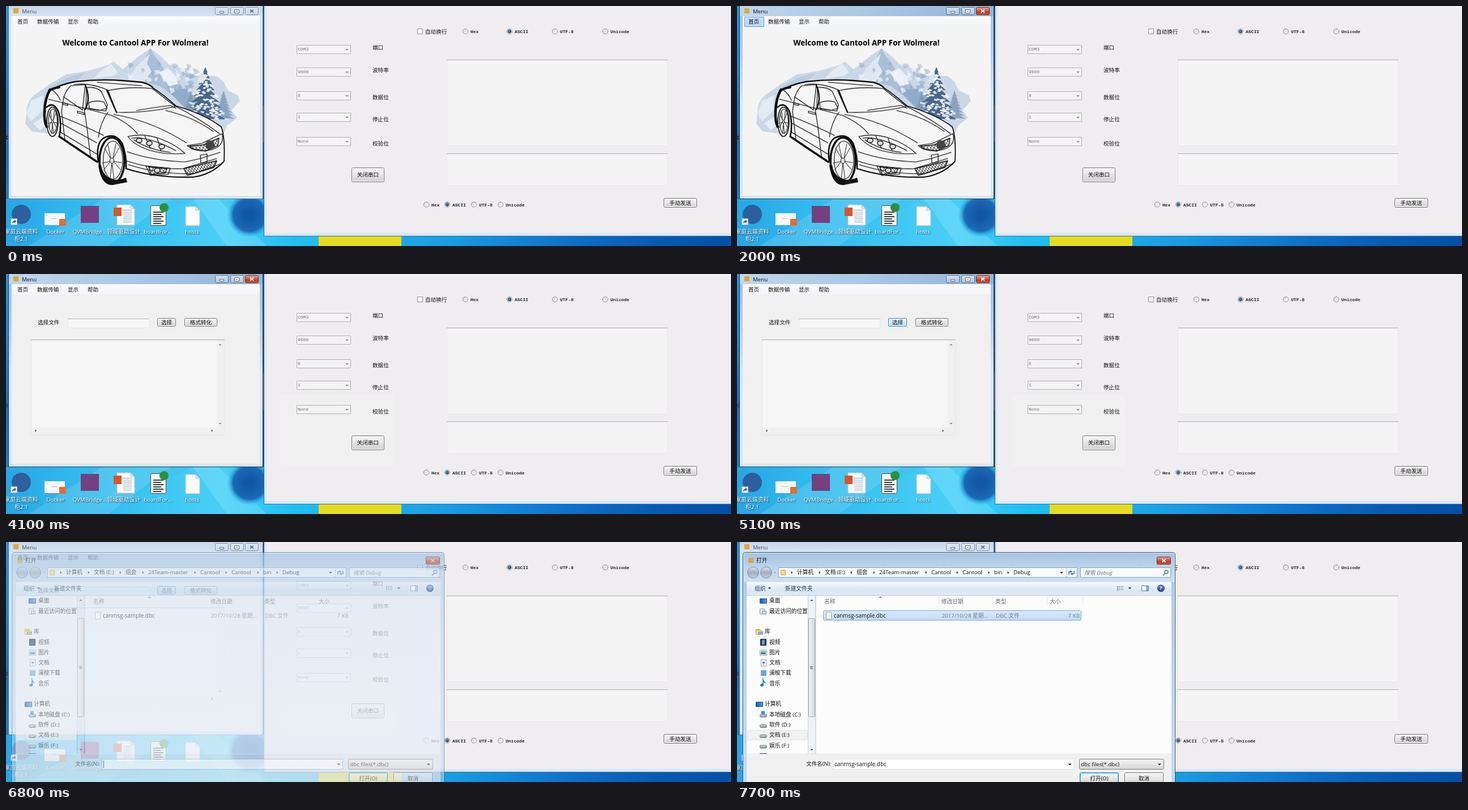
Write an HTML page with a canvas that moves like this. It is 1280 px wide and 425 px high and loops after 8000 ms.

```html
<!DOCTYPE html>
<html lang="zh-CN">
<head>
<meta charset="utf-8">
<title>Cantool</title>
<style>
html, body { margin: 0; width: 100%; height: 100%; overflow: hidden; background: #1583d6; }
canvas { display: block; width: 100vw; height: 100vh; }
</style>
</head>
<body>
<canvas id="stage" width="1280" height="425"></canvas>
<script>
const g = document.getElementById('stage').getContext('2d');
const LOOP = 8000, STEP = 100;
const UI = '"Open Sans", "Noto Sans CJK SC", "Noto Sans CJK", sans-serif';
const MONO = '"Liberation Mono", "Noto Sans CJK SC", "Noto Sans CJK", monospace';
const within = (t, a, b) => t >= a && t < b;
const clamp = v => Math.max(0, Math.min(1, v));

function fade(x0, y0, x1, y1, colors) {
  const f = g.createLinearGradient(x0, y0, x1, y1);
  colors.forEach((c, i) => f.addColorStop(i / (colors.length - 1), c));
  return f;
}
const vert = (y, h, ...colors) => fade(0, y, 0, y + h, colors);

function rect(x, y, w, h, fill) {
  g.fillStyle = fill;
  g.fillRect(x, y, w, h);
}
function box(x, y, w, h, fill, line, r = 0) {
  g.beginPath();
  g.roundRect(x + .5, y + .5, w - 1, h - 1, r);
  if (fill) { g.fillStyle = fill; g.fill(); }
  if (line) { g.strokeStyle = line; g.lineWidth = 1; g.stroke(); }
}
function disc(x, y, r, fill, line, ry = r) {
  g.beginPath();
  g.ellipse(x, y, r, ry, 0, 0, 7);
  if (fill) { g.fillStyle = fill; g.fill(); }
  if (line) { g.strokeStyle = line; g.stroke(); }
}
function shape(d, fill, line, w = 1) {
  const p = new Path2D(d);
  if (fill) { g.fillStyle = fill; g.fill(p); }
  if (line) { g.strokeStyle = line; g.lineWidth = w; g.stroke(p); }
}
// cy is the optical middle of the line
function text(s, x, cy, { size = 9.8, color = '#111', font = UI, weight = '', align = 'left' } = {}) {
  g.font = `${weight} ${size}px ${font}`;
  g.textAlign = align;
  g.fillStyle = color;
  g.fillText(s, x, cy + size * .36);
}
function arrow(x, y, r, color, turn = 0) {
  g.save();
  g.translate(x, y);
  g.rotate(turn * Math.PI / 2);
  shape(`M${-r} ${-r / 2}L${r} ${-r / 2}L0 ${r / 2}Z`, color);
  g.restore();
}
function button(x, y, w, h, label, glow = 0, focus = false) {
  box(x, y, w, h, vert(y, h, '#f4f4f4', '#ececec', '#dcdcdc', '#cfcfcf'), focus ? '#2c86b8' : '#707070', 2);
  if (glow) {
    g.save();
    g.globalAlpha *= glow;
    box(x, y, w, h, vert(y, h, '#eaf6fd', '#d9f0fc', '#bee6fd', '#a7d9f5'), '#3c7fb1', 2);
    g.restore();
  }
  box(x + 1, y + 1, w - 2, h - 2, null, focus ? '#5fd0f3' : '#fafafa', 1.5);
  text(label, x + w / 2, y + h / 2, { size: 9.6, align: 'center' });
}
function field(x, y, w, h, fill, top) {
  box(x, y, w, h, fill, '#e8e7eb');
  rect(x, y, w, 1, top);
}
function closeBox(x, y, w, h, red) {
  const fill = red ? vert(y, h, '#e8b0a4', '#d4735f', '#c0381f', '#d8694c') : vert(y, h, '#dde8f3', '#cbdaea');
  box(x, y, w, h, fill, red ? '#6d2a25' : '#8493a6', 2);
  const cx = x + w / 2, cy = y + h / 2;
  shape(`M${cx - 3} ${cy - 2.5}l6 5m0 -5l-6 5`, null, red ? '#fff' : '#6a7583', 1.7);
}
function formIcon(x, y) {
  rect(x, y, 9, 9, '#d9a83c');
}

function wallpaper() {
  rect(0, 0, 1280, 425, fade(0, 0, 1280, 0,
    ['#1b9be0', '#2bb8ee', '#3cc6f3', '#4acff6', '#1fc0f2', '#1bb2ec', '#1a9fe4', '#1285d6', '#0d6cc4', '#085ab2', '#0450a6']));
  shape('M0 342H330L150 425H0Z', 'rgba(60,190,235,.35)');
  shape('M170 342L290 342L180 425L40 425Z', 'rgba(255,255,255,.12)');
  shape('M330 342L375 342L460 425L390 425Z', 'rgba(190,245,255,.2)');
  rect(0, 0, 5, 342, vert(0, 342, '#2293e2', '#1f8ade', '#1274cc', '#1480d2'));
  const shade = g.createRadialGradient(430, 370, 8, 430, 370, 40);
  shade.addColorStop(0, '#1257a6');
  shade.addColorStop(.65, '#1b69b6');
  shade.addColorStop(1, 'rgba(31,180,235,0)');
  rect(388, 342, 70, 66, shade);
  rect(552, 408, 146, 146, '#e6dc1e');
  disc(3, 233, 2.5, null, '#222');
  rect(453, 0, 3, 342, '#1d4f80');
  rect(453, 107, 2, 26, '#6b3428');
  rect(453, 175, 2, 66, '#a2603a');
}

function sheet(x, y, w, h) {
  shape(`M${x} ${y}h${w - 7}l7 7v${h - 7}h${-w}Z`, '#fbfcfd', '#b9c3cc');
  shape(`M${x + w - 7} ${y}v7h7Z`, '#dfe5ea', '#b9c3cc');
}
function desktopIcons() {
  disc(27, 369, 17, '#2d5f9e');
  box(8, 376, 12, 12, '#f5f8fb', '#9db0c4');
  shape('M11 385q0-4 4-5v-2l3 3.500l-3 3.500v-2q-2 0-4 2Z', '#1d5fae');
  rect(68, 367, 36, 21, '#f6f6f6');
  rect(80, 376, 10, 1, '#bbb');
  rect(94, 377, 12, 12, '#df6d3a');
  rect(132, 354, 32, 30, '#74407f');
  sheet(196, 352, 31, 36);
  for (let i = 0; i < 7; i++) rect(207, 361 + i * 3.5, 15, 1, '#8fa3b8');
  rect(190, 357, 14, 15, '#d4562c');
  box(255, 353, 28, 36, '#f7f7f7', '#3d4a44', 2);
  for (let i = 0; i < 6; i++) rect(260, 364 + i * 4, i % 2 ? 14 : 18, 2, '#39443f');
  disc(279, 357, 8, '#2f8f3e');
  sheet(317, 355, 25, 34);

  g.save();
  g.shadowColor = 'rgba(0,20,50,.9)';
  g.shadowBlur = 2;
  g.shadowOffsetX = g.shadowOffsetY = 1;
  const names = ['家庭云端资料', 'Docker', 'QVMBridge...', '领域驱动设计', 'boardFor...', 'hosts'];
  names.forEach((s, i) => text(s, 27 + i * 60.3, 399, { color: '#fff', align: 'center' }));
  text('柜2.1', 27, 412, { color: '#fff', align: 'center' });
  g.restore();
}

function radio(x, y, label, on) {
  g.lineWidth = 1;
  disc(x, y, 4.6, fade(x - 4, y - 4, x + 4, y + 4, ['#d4d6d8', '#fbfbfb']), '#8e8f8f');
  if (on) disc(x, y, 2.7, fade(x - 2, y - 2, x + 2, y + 2, ['#5fb4de', '#12395c']), '#174a72');
  text(label, x + 9, y + .5, { size: 8, font: MONO, weight: 'bold', color: '#222' });
}
function serialWindow(t) {
  rect(455, 0, 825, 408, '#3d698f');
  rect(456, 0, 824, 407, '#d8e7f4');
  rect(460, 2, 820, 400, '#f0edf1');
  rect(460, 1, 820, 1, '#fafbfd');
  if (t >= 4000) rect(485, 213, 200, 128, '#f0f0f0');

  const rows = [['COM3', '端口', 77, 73.5], ['9600', '波特率', 117, 114], ['8', '数据位', 159, 162],
    ['1', '停止位', 197, 200.5], ['None', '校验位', 240, 243.5]];
  for (const [value, label, y, ly] of rows) {
    box(513, y - 8, 96, 16, '#f4f4f4', '#adadb0');
    box(530, y - 5, 63, 10, null, '#efeff1');
    arrow(602, y + .5, 3, '#8b8b8b');
    text(value, 515, y - .5, { size: 8, font: MONO, color: '#6d6d6d' });
    text(label, 647, ly, { size: 9.6 });
  }
  button(610, 286, 58, 26, '关闭串口');
  button(1161, 340, 59, 17, '手动发送');

  box(726, 40, 10, 10, '#f6f6f6', '#8e8f8f');
  text('自动换行', 740, 45.5, { size: 9.6 });
  [[811, 'Hex'], [889, 'ASCII'], [969, 'UTF-8'], [1058, 'Unicode']]
    .forEach(([x, s], i) => radio(x, 45, s, i === 1));
  [[742, 'Hex'], [779, 'ASCII'], [826, 'UTF-8'], [873, 'Unicode']]
    .forEach(([x, s], i) => radio(x, 351.5, s, i === 1));

  field(778, 95, 390, 153, '#f4f4f4', within(t, 600, 1200) ? '#9fb4c6' : '#abadb3');
  field(778, 261, 390, 57, '#f4f4f4', '#abadb3');
}

function tree(x, top, height, half, color) {
  g.beginPath();
  g.moveTo(x, top);
  const tiers = 9;
  for (const side of [1, -1]) {
    for (let k = 0; k < tiers; k++) {
      const i = side > 0 ? k + 1 : tiers - k;
      const reach = side * half * i / tiers, y = top + height * i / tiers;
      const tip = [x + reach, y], notch = [x + reach * .5, y - 1];
      for (const p of side > 0 ? [tip, notch] : [notch, tip]) g.lineTo(...p);
    }
  }
  g.fillStyle = color;
  g.fill();
}
function mountains() {
  shape('M36 190Q36 168 52 156L75 140L106 121L145 115L182 104L190 98L206 112L236 88L255 75L272 88L288 104L309 110L332 123L372 124L384 134L392 150L409 158L413 168L398 185L408 198L390 212L380 240L90 228L45 222L34 208Z', '#cad7e7');
  shape('M255 75L262 88L272 100L281 116L300 128L322 160L296 160L272 142L245 135L250 120L240 108L246 92Z', '#a9bed7');
  shape('M254 84L249 102L257 116L244 134L215 130L230 108Z', '#dfe8f2');
  shape('M270 118L286 110L298 122L304 138L288 142Z', '#eaf0f6');
  shape('M186 102L198 118L188 124L170 126L154 129L166 116Z', '#e4ebf3');
  shape('M75 145L112 125L140 118L126 131L92 148L78 160Z', '#b9cbe0');
  shape('M44 168L66 158L64 186L44 204L36 190Z', '#e2eaf2');
  shape('M48 208L66 196L70 212L60 220Z', '#e6edf4');
  shape('M286 150L320 146L342 166L360 195L320 185Z', '#91abca');
  let seed = 7;
  const rnd = () => (seed = seed * 16807 % 2147483647) / 2147483647;
  for (let i = 0; i < 40; i++) {
    const x = 205 + rnd() * 125, y = 100 + rnd() * 48, w = 3 + rnd() * 9;
    shape(`M${x} ${y}l${w} ${3 - rnd() * 7}l${w * .4} 5l${-w} 4Z`, i % 2 ? 'rgba(239,244,249,.7)' : 'rgba(137,164,199,.45)');
  }
  tree(326, 153, 43, 18, '#7f99b8');
  tree(384, 150, 50, 20, '#8aa3c0');
  tree(352, 108, 93, 37, '#4a658a');
  for (let i = 0; i < 110; i++) {
    const k = .12 + rnd() * .88, x = 349 + (rnd() - .5) * 78 * k, y = 108 + 92 * k;
    shape(`M${x} ${y}l${2 + rnd() * 5} 1.500l-2 2.500l-5-1.500Z`, i % 3 ? '#dbe5ef' : '#f4f7fa');
  }
}

function wheel(x, y, rx, ry, spokes) {
  g.lineWidth = rx / 6;
  disc(x, y, rx, '#f4f4f4', '#111', ry);
  g.lineWidth = 1.2;
  disc(x + rx * .08, y - 1, rx * .78, null, '#222', ry * .82);
  for (let i = 0; i < spokes; i++) {
    const a = i * 2 * Math.PI / spokes + .3;
    for (const d of [-.2, .2]) {
      const ex = x + Math.cos(a + d) * rx * .78, ey = y + Math.sin(a + d) * ry * .8;
      shape(`M${x + Math.cos(a) * 3} ${y + Math.sin(a) * 4}L${ex} ${ey}`, null, '#222', 1);
    }
  }
  disc(x, y, rx * .17, '#ddd', '#111', ry * .12);
}
function mesh(d, gap) {
  g.save();
  g.clip(new Path2D(d));
  for (let x = 235; x < 430; x += gap) {
    shape(`M${x} 225l-45 90M${x - 45} 225l90 90`, null, '#222', .9);
  }
  g.restore();
  shape(d, null, '#111', 1.5);
}
function car() {
  g.lineJoin = g.lineCap = 'round';
  shape('M75 150Q95 138 122 133Q165 128 205 131L240 135Q262 142 300 177Q350 190 380 214Q388 235 385 275Q360 300 330 303Q265 304 212 288L185 314L162 275L95 234L72 222Q64 190 70 165Z', '#f5f5f5');
  wheel(82, 205, 10, 26, 5);
  wheel(187, 274, 22, 41, 5);
  shape('M163 282Q168 318 188 317L214 312L212 304Q192 312 180 303Q170 296 168 282Z', '#111');

  const heavy = [
    ['M78 148Q69 162 68 186Q67 205 72 214', 4.5], ['M76 150Q84 145 94 144', 4], ['M94 231L128 254L161 276', 3.5],
    ['M75 151Q95 139 122 134Q165 129 205 132L240 135Q252 138 259 144', 2.4],
    ['M212 288Q265 305 330 303Q362 299 384 276', 2.2], ['M72 179Q84 168 93 188Q99 210 94 231', 2.6],
    ['M163 276Q158 244 172 234Q193 223 205 243Q213 264 212 288', 2.6],
    ['M258 144Q278 157 300 177Q350 191 380 214Q387 232 385 275', 1.8],
    ['M178 149L195 188M140 140Q150 164 140 183', 2.4]
  ];
  for (const [d, w] of heavy) shape(d, null, '#0c0c0c', w);

  const lines = [
    'M178 150Q215 142 258 146L299 178Q245 190 195 188Z',
    'M120 139Q150 135 180 149L195 188',
    'M102 161Q108 145 115 141L140 139L135 184Z M142 144Q160 143 168 151L179 175L176 186L141 180Z',
    'M146 171Q159 166 173 170L178 181L165 185L147 182Z',
    'M75 165Q120 176 184 193M95 195Q130 208 172 229M96 207L160 242M94 222L160 262',
    'M102 161L98 186L104 238M138 182L143 216L149 266M180 188Q167 205 163 232',
    'M185 193Q215 206 232 226M190 192Q255 202 318 242',
    'M300 178Q340 198 377 226M282 185Q330 196 366 222',
    'M215 231Q243 224 272 235Q300 245 316 261Q282 264 252 255Q226 246 215 231Z',
    'M222 234Q250 230 300 256M226 237Q250 254 290 259M245 230L255 252M267 235L274 257',
    'M214 258Q260 274 316 276L343 270L378 259M212 274Q260 290 312 288L372 270',
    'M320 247L346 243Q367 233 381 226Q386 241 373 250Q353 261 328 253Z',
    'M343 264L355 262V276L344 278ZM216 281Q270 298 330 297L378 280',
    'M247 283L290 287L286 298L255 300Z M100 171l9 2v3l-9-2ZM126 186l12 3v3l-12-3Z',
    'M82 149Q92 156 96 167M161 135L240 141M230 185Q258 180 290 176L300 181'
  ];
  for (const d of lines) {
    shape(d, null, '#151515', 1.2);
    g.save();
    g.translate(.6, 1.2);
    shape(d, null, 'rgba(20,20,20,.3)', .6);
    g.restore();
  }
  mesh('M314 288L372 274L367 286L320 300Z', 5);
  mesh('M252 285L284 288L281 296L256 298Z', 7);
  mesh('M324 248L348 246L376 234L374 247L352 257L330 253Z', 6);
  for (const [x, y] of [[235, 238], [253, 243], [275, 249], [267, 291]]) disc(x, y, 5, '#ddd', '#111', 4);
  disc(360, 246, 8, '#444');
  g.lineCap = 'butt';
  g.lineJoin = 'miter';
}

function filePage(t) {
  text('选择文件', 56, 85.5, { size: 9.6 });
  field(109, 79, 144, 17, '#f7f7f7', '#b4b6bb');
  const hover = within(t, 5100, 6300) ? 1 : 0;
  button(267, 78, 33, 15, '选择', hover, t >= 6300);
  button(315, 78, 58, 15, '格式转化');
  field(44, 116, 342, 170, '#f6f6f6', within(t, 4600, 4900) ? '#7da2c4' : '#a6a8ad');
  rect(372, 117, 13, 168, '#f0f0f0');
  rect(45, 272, 340, 13, '#f0f0f0');
  arrow(378, 125, 2.6, '#777', 2);
  arrow(378, 265, 2.6, '#777');
  arrow(52, 277.5, 2.6, '#555', 1);
  arrow(364, 277.5, 2.6, '#555', 3);
}
function menuWindow(t) {
  const active = within(t, 2000, 2200) || within(t, 3800, 6600);
  const first = t < 4000;
  rect(4, 0, 450, 342, active ? '#153a5c' : '#53708c');
  rect(5, 0, 448, 341, active ? vert(0, 341, '#a0bfe0', '#b4cde7', '#d9e6f3', '#d9e6f3', '#d9e6f3') : '#d9e6f3');
  rect(5, 0, 448, 18, active ? fade(5, 0, 453, 0, ['#c0d6ec', '#aac7e4', '#94b5d8']) : vert(0, 18, '#c6d7e9', '#d6e4f2'));
  formIcon(13, 4);
  text('Menu', 28, 9, { color: active ? '#111' : '#4a4f55' });
  for (const x of [369, 396]) {
    box(x, 2, 24, 14, active ? vert(2, 14, '#d5e3f2', '#a9c3df') : vert(2, 14, '#dde8f3', '#cbdaea'), active ? '#57708e' : '#8493a6', 2);
  }
  box(377, 9, 8, 4, '#fff', '#596675');
  box(403, 6, 9, 7, '#fff', '#596675');
  rect(406, 9, 3, 1, '#596675');
  closeBox(422, 2, 24, 14, active);

  rect(10, 18, 438, 318, first ? '#f4f4f4' : '#f0f0f0');
  rect(10, 18, 438, 19, vert(18, 19, '#fafafc', '#f3f4f7'));
  if (within(t, 1700, 2200)) box(13, 19, 35, 18, vert(19, 18, '#c9e2fa', '#b5d6f6'), '#5a9fe0');
  [['首页', 20], ['数据传输', 55], ['显示', 109], ['帮助', 144]].forEach(([s, x]) => text(s, x, 27.5, { size: 9.6 }));

  if (first) {
    mountains();
    car();
    text('Welcome to Cantool APP For Wolmera!', 228.5, 65, { size: 13.5, weight: 'bold', color: '#000', align: 'center' });
  } else filePage(t);
}

function alertBox(t) {
  const alpha = t < 2200 ? 0 : t < 3800 ? 1 : t < 3900 ? .6 : t < 4000 ? .25 : 0;
  if (!alpha) return;
  g.save();
  g.globalAlpha = alpha;
  box(485, 213, 200, 147, vert(213, 147, '#a4c2e0', '#b7d0e9', '#b9d3ec'), '#1c3d5c', 3);
  box(486, 214, 198, 145, null, '#dcecf8', 2);
  text('提示', 494, 228, { size: 9.6 });
  closeBox(652, 221, 25, 14, true);
  rect(491, 237, 188, 73, '#fcfcfc');
  rect(491, 310, 188, 43, '#f0f0f0');
  shape('M523.500 264L535 285H512Z', vert(263, 22, '#ffe45a', '#f3b800'), '#9c8330', 1.5);
  rect(522.5, 270, 2.4, 8, '#222');
  rect(522.5, 280, 2.4, 2.4, '#222');
  text('请先加载数据库', 546, 272, { size: 9.6 });
  button(526, 320, 68, 22, '确定', clamp((t - 3200) / 400), true);
  button(602, 320, 69, 22, '取消');
  g.restore();
}

function sideIcon(kind, x, y) {
  const kinds = {
    screen() { box(x, y - 4, 13, 9, fade(x, y, x + 13, y, ['#1a56b0', '#4aa3e6']), '#2b4c7a'); },
    pages() { box(x, y - 5, 9, 10, '#eef2f6', '#8796a6'); box(x + 4, y - 1, 8, 6, '#d6e4f0', '#7088a0'); },
    folder() { box(x, y - 5, 8, 5, '#f0cf6a', '#c79f34'); box(x, y - 3, 12, 8, '#f8e196', '#cfab48'); box(x + 4, y, 9, 5, '#8fc3e8', '#5a8fb8'); },
    film() { box(x + 1, y - 6, 11, 12, '#2c3540', '#1c2229'); rect(x + 4, y - 4, 5, 8, '#5ba3d6'); },
    image() { box(x, y - 5, 13, 10, '#fff', '#8a9aa8'); rect(x + 2, y - 3, 9, 3, '#6db5e8'); rect(x + 2, y, 9, 3, '#4d7a86'); },
    doc() { box(x + 2, y - 6, 10, 12, '#fff', '#8a9aa8'); rect(x + 5, y - 2, 4, 3, '#3a77b4'); rect(x + 5, y + 2, 4, 1, '#99a'); },
    plain() { rect(x + 2, y - 5, 10, 10, '#6ba6dc'); },
    note() { shape(`M${x + 6} ${y + 3}V${y - 6}q1 3 4 5`, null, '#1d78cc', 1.8); disc(x + 4, y + 3, 3, '#1d78cc', null, 2.4); },
    drive() { box(x, y - 1, 13, 6, vert(y - 1, 6, '#e3e6e8', '#888e93'), '#6f757a', 2); rect(x + 8, y + 2, 3, 1.5, '#4ec23c'); },
    system() { kinds.drive(); rect(x + 3, y - 6, 6, 6, '#3c8fd0'); }
  };
  kinds[kind]();
}
function sidebar() {
  rect(17, 95, 108, 280, '#fcfcfd');
  g.save();
  g.beginPath();
  g.rect(17, 95, 108, 280);
  g.clip();
  box(18, 333, 107, 18, '#f0f1f2', '#e3e4e6', 2);
  const items = [['桌面', 104, 'screen'], ['最近访问的位置', 123, 'pages'], ['库', 159, 'folder', 33],
    ['视频', 177.5, 'film'], ['图片', 196, 'image'], ['文档', 214, 'doc'], ['澜梭下载', 232, 'plain'],
    ['音乐', 250.5, 'note'], ['计算机', 287, 'screen', 33], ['本地磁盘 (C:)', 305.5, 'system'],
    ['软件 (D:)', 324, 'drive'], ['文档 (E:)', 342, 'drive'], ['娱乐 (F:)', 360.5, 'drive'], ['', 378, 'screen']];
  for (const [s, y, kind, x = 40] of items) {
    sideIcon(kind, x, y);
    text(s, x + (x < 40 ? 16 : 17), y, { size: 9.7 });
  }
  g.restore();
  rect(126, 95, 12, 280, '#f2f2f3');
  box(126, 135, 12, 175, fade(126, 0, 138, 0, ['#f4f4f5', '#d5d6d9']), '#a0a3a8', 1);
  for (const y of [220, 222, 224]) rect(129, y, 5, 1, '#666');
  arrow(132, 103, 2.5, '#333', 2);
  arrow(132, 368, 2.5, '#333');
  rect(139, 95, 1, 280, '#e2e6ec');
}
function fileList(t) {
  rect(140, 95, 627, 280, '#fcfcfd');
  const grey = { color: '#5f6b78', size: 9.7 };
  [['名称', 154], ['修改日期', 361], ['类型', 456], ['大小', 552]].forEach(([s, x]) => text(s, x, 106, grey));
  for (const x of [356, 451, 547, 610]) rect(x, 96, 1, 18, '#e6eaef');
  arrow(253, 97.5, 3, '#6e95b8', 2);
  g.save();
  g.globalAlpha *= clamp((t - 7300) / 300);
  box(152, 121, 456, 18, vert(121, 18, '#dcebfc', '#c1dbfa'), '#7da2ce', 2);
  g.restore();
  box(157, 124, 10, 13, '#fff', '#9aa3ab');
  text('canmsg-sample.dbc', 171, 130, { size: 9.9 });
  const dim = { color: '#747b82' };
  text('2017/10/28 星期...', 361.5, 130, dim);
  text('DBC 文件', 457, 130, dim);
  text('7 KB', 605, 130, { ...dim, align: 'right' });
}
function navBar() {
  g.lineWidth = 1;
  for (const x of [28.5, 51.5]) {
    disc(x, 54, 9.8, vert(44, 20, '#dfe8f0', '#a2afbd', '#c2ced9'), '#7d8d9d');
  }
  arrow(67, 54, 2, '#92a5b8');
  box(73, 45, 528, 18, '#f9fbfd', '#8ba3bb');
  rect(581, 46, 1, 16, '#a9bccd');
  box(77, 49, 9, 10, '#f5d777', '#c9a33f');
  const crumbs = [['计算机', 106], ['文档 (E:)', 155], ['组会', 211], ['24Team-master', 251], ['Cantool', 343],
    ['Cantool', 398], ['bin', 454], ['Debug', 488]];
  for (const [s, x] of crumbs) {
    arrow(x - 9, 54, 2.5, '#222', 3);
    text(s, x, 54, { size: 9.7 });
  }
  arrow(573, 54.5, 3, '#222');
  shape('M586 58V53h5l-2.500-2.500M595 51v5h-5l2.500 2.500', null, '#2b6cb0', 1.5);
  box(606, 45, 160, 18, '#f9fbfd', '#8ba3bb');
  text('搜索 Debug', 613, 54.5, { weight: 'italic', color: '#6d7680' });
  g.lineWidth = 1.4;
  disc(758, 53, 3, null, '#3a78b8');
  shape('M756 55.500l-4 4', null, '#3a78b8', 1.6);
}
function toolBar() {
  rect(17, 71, 750, 24, vert(71, 24, '#f6fafe', '#e6eff9', '#d9e6f4', '#e2edf8'));
  rect(17, 94, 750, 1, '#b4c6da');
  text('组织', 31, 82.5, { color: '#1e395b', size: 9.7 });
  arrow(57.5, 82, 3, '#1e395b');
  text('新建文件夹', 85, 82.5, { color: '#1e395b', size: 9.7 });
  for (let i = 0; i < 3; i++) {
    rect(671, 78 + i * 3, 2, 2, '#6f8fb5');
    rect(674, 78 + i * 3, 3, 1, '#7c8b9c');
    rect(678, 78 + i * 3, 4, 1, '#7c8b9c');
  }
  arrow(693.5, 82, 3, '#1e395b');
  box(714, 77, 13, 10, '#fff', '#5b7fa8');
  rect(722, 78, 4, 8, '#7fb2e0');
  g.lineWidth = 1;
  disc(748.5, 82, 6, vert(76, 12, '#6f8fd8', '#1a3587'), '#2b3f78');
  text('?', 748.5, 82, { color: '#fff', weight: 'bold', size: 9, align: 'center' });
}
function openDialog(t) {
  const alpha = t < 6800 ? 0 : t < 6900 ? .5 : 1;
  if (!alpha) return;
  g.save();
  g.globalAlpha = alpha;
  box(10, 18, 764, 420, vert(18, 420, '#a9c6e3', '#bcd4ec', '#c3d9ee'), '#274d70', 4);
  box(11, 19, 762, 418, null, '#e4f0fa', 3);
  rect(12, 21, 760, 50, vert(21, 50, '#a8c5e2', '#bdd4eb', '#cfe0f1'));
  formIcon(20, 28);
  text('打开', 34, 33, { size: 9.7 });
  closeBox(741, 26, 25, 14, true);
  navBar();
  toolBar();
  fileList(t);
  sidebar();
  rect(17, 375, 750, 50, '#f0f0f0');
  rect(17, 375, 750, 1, '#e2e6ec');
  text('文件名(N):', 166, 393, { align: 'right', size: 9.5 });
  const named = t >= 7600;
  box(169, 384, 426, 19, '#fefefe', named ? '#dfe2e6' : '#74a9d2');
  arrow(587.5, 394, 3, '#111');
  if (named) text('canmsg-sample.dbc', 172, 393.5, { size: 9.9 });
  else rect(172, 387, 1, 13, '#000');
  box(604, 384, 150, 19, vert(384, 19, '#f3f3f3', '#e6e6e6', '#d2d2d2'), '#7c7c7c', 2);
  text('dbc files(*.dbc)', 607, 393);
  arrow(746, 394, 3, '#111');
  button(605, 408, 69, 22, '打开(O)', 0, true);
  button(684, 408, 69, 22, '取消');
  g.restore();
}

function draw() {
  const t = Math.floor(performance.now() % LOOP / STEP) * STEP;
  wallpaper();
  desktopIcons();
  serialWindow(t);
  menuWindow(t);
  alertBox(t);
  openDialog(t);
  requestAnimationFrame(draw);
}
draw();
</script>
</body>
</html>
```
